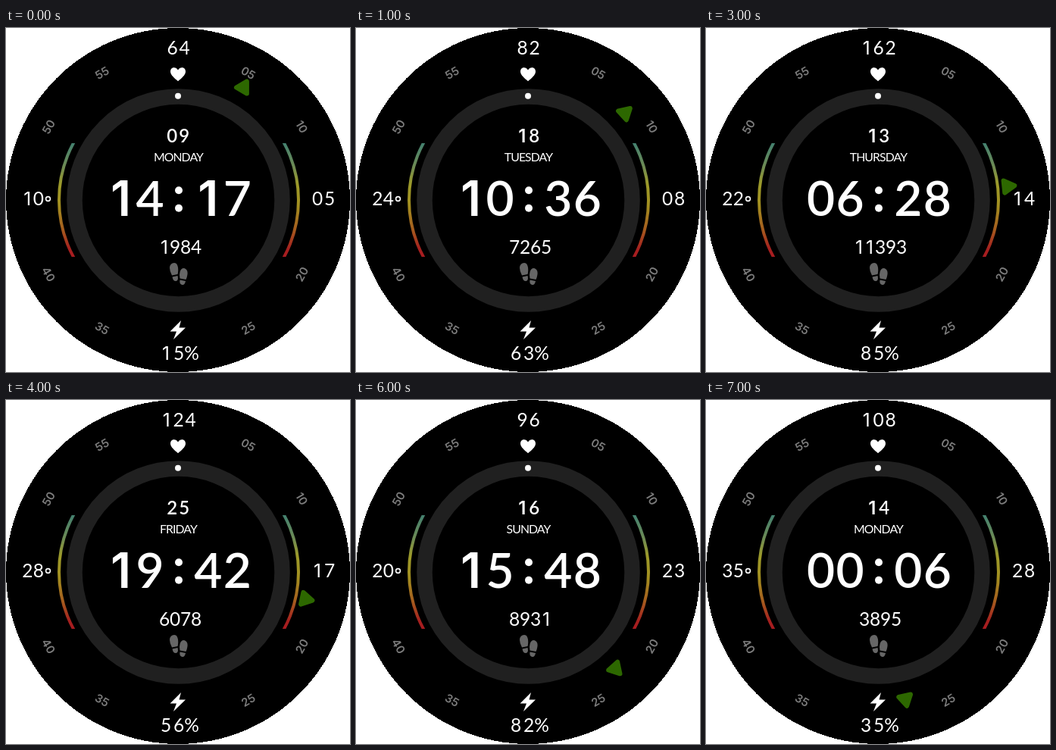
An HTML page that plays this animation: 454x454 px, repeating every 8 s.

```html
<!DOCTYPE html>
<html lang="en">
<head>
<meta charset="utf-8">
<title>Watch face</title>
<style>
  html, body { margin: 0; width: 100%; height: 100%; overflow: hidden; background: #fff; }
  svg { display: block; width: 454px; height: 454px; }
  text { text-anchor: middle; fill: #fff; font-family: Lato, sans-serif; }
  .one { font-family: Inter, sans-serif; }
  .small { font-size: 24.5px; }
  .date { font-size: 24px; font-weight: 600; }
  .time { font-size: 64px; font-weight: 600; }
  .weekday { font-size: 15.8px; letter-spacing: -.9px; }
  .mark { font: 600 15px Inter, sans-serif; fill: #7c7c7c; }
</style>
</head>
<body>
<svg viewBox="0 0 454 454">
  <defs>
    <linearGradient id="heat" gradientUnits="userSpaceOnUse" x1="0" y1="152" x2="0" y2="302">
      <stop offset="0" stop-color="#43806f"/>
      <stop offset=".2" stop-color="#6c8a55"/>
      <stop offset=".36" stop-color="#9c9a2a"/>
      <stop offset=".55" stop-color="#a38f20"/>
      <stop offset=".76" stop-color="#a55c1e"/>
      <stop offset=".93" stop-color="#a5201f"/>
      <stop offset="1" stop-color="#a81c20"/>
    </linearGradient>
    <clipPath id="band"><rect y="152" width="454" height="150"/></clipPath>
  </defs>
  <circle cx="227" cy="227" r="227" shape-rendering="crispEdges"/>
  <circle cx="227.5" cy="227.5" r="137" fill="none" stroke="#202020" stroke-width="20.5"/>
  <circle cx="228" cy="227" r="158" fill="none" stroke="url(#heat)" stroke-width="4" clip-path="url(#band)"/>
  <circle cx="227" cy="89.700" r="4" fill="#fff"/>
  <g id="marks"></g>
  <path id="hand" d="M0-9.300L8.050 4.650H-8.050Z" fill="#2d6800" stroke="#2d6800" stroke-width="6" stroke-linejoin="round"/>
  <g fill="#fff">
    <path d="M227 70.300C223 66.500 217 62.500 217 57.500C217 51 224.500 50.500 227 55.500C229.500 50.500 237 51 237 57.500C237 62.500 231 66.500 227 70.300Z"/>
    <path d="M231 386L216.500 400.500H225L221 411L237 395.500H228.500Z"/>
    <circle cx="228" cy="214.300" r="5"/>
    <circle cx="228" cy="237.800" r="5"/>
  </g>
  <g fill="#666">
    <path d="M222 310C226 310 227.500 315 227.200 320Q227 324 226.500 325L219 326.500Q216 321 216 316.500Q216.500 310 222 310Z"/>
    <path d="M219.500 328.500L226.500 327Q228 333 224.500 334Q220.500 334.500 219.500 328.500Z"/>
    <path d="M234.500 317C238.500 317.500 240 321 239.500 325Q239 329 237.500 332L229.500 330.500Q228.500 326 229.500 322Q231 317 234.500 317Z"/>
    <path d="M229.500 332.500L237 334Q236 339.500 232.500 339Q228.500 338 229.500 332.500Z"/>
  </g>
  <circle cx="55.500" cy="225.500" r="2.900" fill="none" stroke="#fff" stroke-width="1.600"/>
  <g id="readout"></g>
</svg>
<script>
const STEP = 1000;
// weekday, date, time, steps, pulse, temperature, battery, second
const states = [
  ['MONDAY', '09', '1417', '1984', '64', '10', '15%', '05'],
  ['TUESDAY', '18', '1036', '7265', '82', '24', '63%', '08'],
  ['WEDNESDAY', '22', '0857', '4356', '135', '35', '42%', '11'],
  ['THURSDAY', '13', '0628', '11393', '162', '22', '85%', '14'],
  ['FRIDAY', '25', '1942', '6078', '124', '28', '56%', '17'],
  ['SATURDAY', '10', '0025', '9927', '151', '33', '41%', '20'],
  ['SUNDAY', '16', '1548', '8931', '96', '20', '82%', '23'],
  ['MONDAY', '14', '0006', '3895', '108', '35', '35%', '28']
];
const $ = id => document.getElementById(id);

const label = (s, x, y, cls, extra = '') => `<text x="${x}" y="${y}" class="${cls}" ${extra}>${s}</text>`;

// Evenly spaced characters centred on x
const digits = (s, x, y, pitch, cls = 'small') => [...s].map((c, i) =>
  label(c, x + (i - (s.length - 1) / 2) * pitch, y, cls + (c === '1' ? ' one' : ''))).join('');

$('marks').innerHTML = [5, 10, 20, 25, 35, 40, 50, 55].map(n => {
  const a = n * Math.PI / 30, tilt = n * 6 + (n > 15 && n < 45 ? 180 : 0);
  const x = 223.3 + 193 * Math.sin(a), y = 227.6 - 194.5 * Math.cos(a);
  return label(String(n).padStart(2, '0'), 0, 5.5, 'mark', `transform="translate(${x} ${y}) rotate(${tilt})"`);
}).join('');

let shown = -1;
function draw(now) {
  const i = Math.floor(now / STEP) % states.length;
  if (i !== shown) {
    shown = i;
    const [weekday, date, time, steps, pulse, temp, battery, second] = states[i];
    $('hand').setAttribute('transform', `rotate(${second * 6} 227.5 227) translate(227.5 55.5)`);
    $('readout').innerHTML =
      digits(pulse, 227.7, 34.5, 16) +
      digits(date, 227.3, 151, 16, 'date') +
      label(weekday, 227.5, 176, 'weekday') +
      digits(time.slice(0, 2), 170.7, 248, 38.5, 'time') +
      digits(time.slice(2), 286, 248, 38.5, 'time') +
      digits(steps, 230, 297.5, 14) +
      digits(temp, 35.5, 234, 14.5) +
      digits(second, 419, 234, 16) +
      digits(battery, 228, 438, 17);
  }
}
const start = performance.now();
function tick() {
  draw(performance.now() - start);
  requestAnimationFrame(tick);
}
tick();
</script>
</body>
</html>
```
